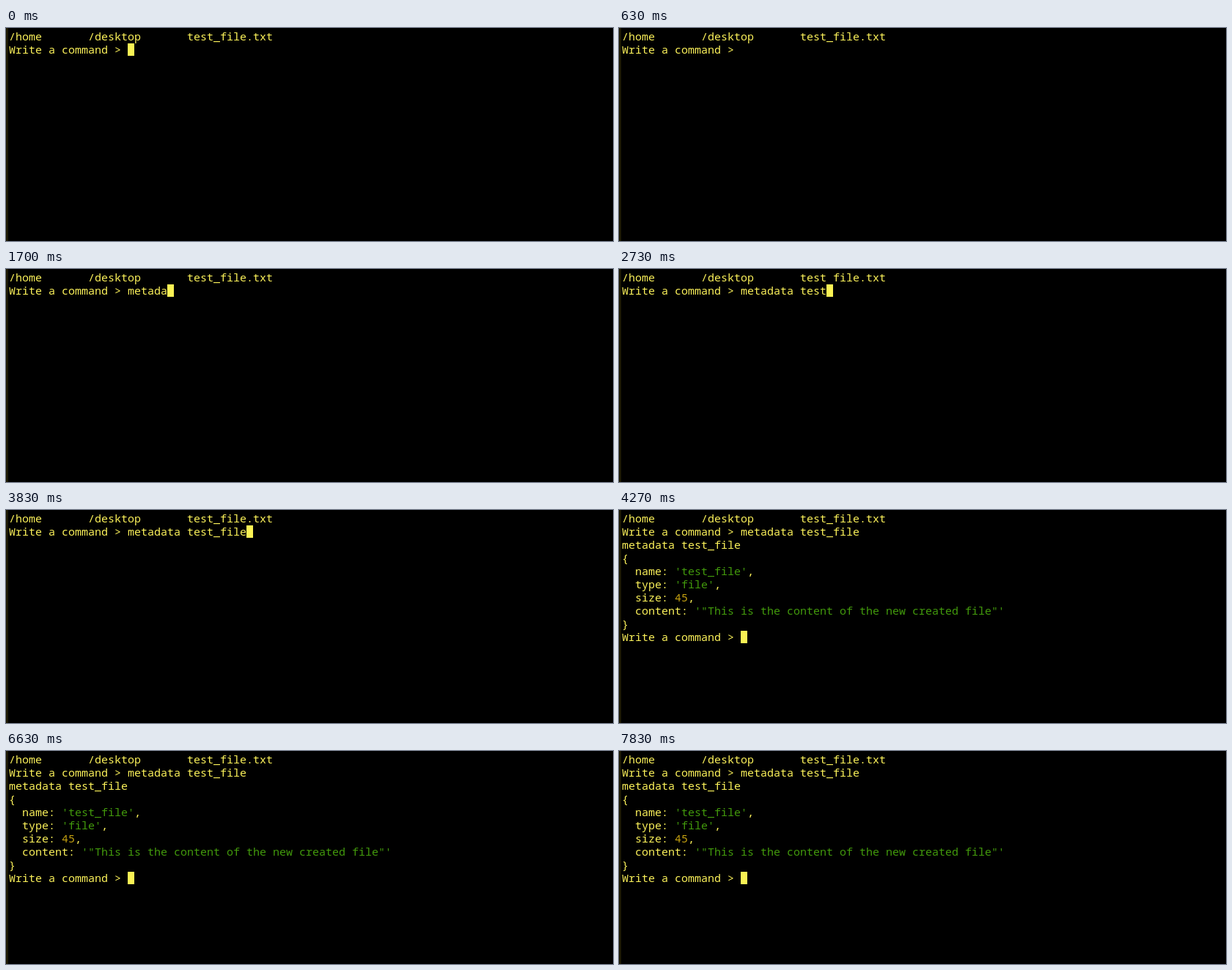
An HTML page that plays this animation: 828 by 291 pixels, repeating every 8260 ms.

```html
<!DOCTYPE html>
<html lang="en">
<head>
<meta charset="utf-8">
<title>Terminal: metadata command</title>
<style>
  html, body { margin: 0; width: 100%; height: 100%; overflow: hidden; background: #000; }
  #stage { position: relative; width: 828px; height: 291px; overflow: hidden; background: #000; }
  #edge { position: absolute; left: 0; top: 0; width: 3px; height: 291px; background: #1c1904; }
  pre {
    position: absolute; left: 4px; top: 2px; margin: 0;
    font: 15px/18px "Noto Sans Mono", "DejaVu Sans Mono", monospace;
    font-variant-ligatures: none; color: #fcf25a;
  }
  .str { color: #429a0c; }
  .num { color: #c4a010; }
  #cursor { position: absolute; width: 9px; height: 17px; background: #faf254; }
</style>
</head>
<body>
<div id="stage">
  <div id="edge"></div>
  <pre>/home       /desktop       test<span id="bar">_</span>file.txt
Write a command &gt; <span id="typed"></span>
<span id="output">metadata test_file
{
  name: <span class="str">'test_file'</span>,
  type: <span class="str">'file'</span>,
  size: <span class="num">45</span>,
  content: <span class="str">'"This is the content of the new created file"'</span>
}
Write a command &gt; </span></pre>
  <div id="cursor"></div>
</div>
<script>
  const LOOP = 8260, ENTER = 4270, BLINK = 600;
  const COL = 9, ROW = 18, LEFT = 4, TOP = 21, PROMPT = 18;
  const command = "metadata test_file";
  // one time per typed character
  const keys = [970, 1170, 1270, 1400, 1600, 1700, 1900, 1970, 2200,
                2370, 2430, 2630, 2730, 3070, 3370, 3500, 3700, 3830];
  const [bar, typed, output, cursor] =
    ["bar", "typed", "output", "cursor"].map(id => document.getElementById(id));

  const show = (el, on) => { el.style.visibility = on ? "visible" : "hidden"; };

  function cursorOn(t) {
    if (t < ENTER) return t < 230 || t >= 830;
    return Math.floor((t - 4230) / BLINK) % 2 === 0;
  }

  function draw(t) {
    const count = keys.filter(k => k <= t).length;
    const done = t >= ENTER;
    typed.textContent = command.slice(0, count);
    show(output, done);
    // the cursor block wipes the underscore above it
    show(bar, t < 2730 || t >= 3070);
    show(cursor, cursorOn(t));
    cursor.style.left = LEFT + COL * (PROMPT + (done ? 0 : count)) + "px";
    cursor.style.top = TOP + (done ? 8 * ROW : 0) + "px";
  }

  const start = performance.now();
  function tick() {
    draw((performance.now() - start) % LOOP);
    requestAnimationFrame(tick);
  }
  tick();
</script>
</body>
</html>
```
